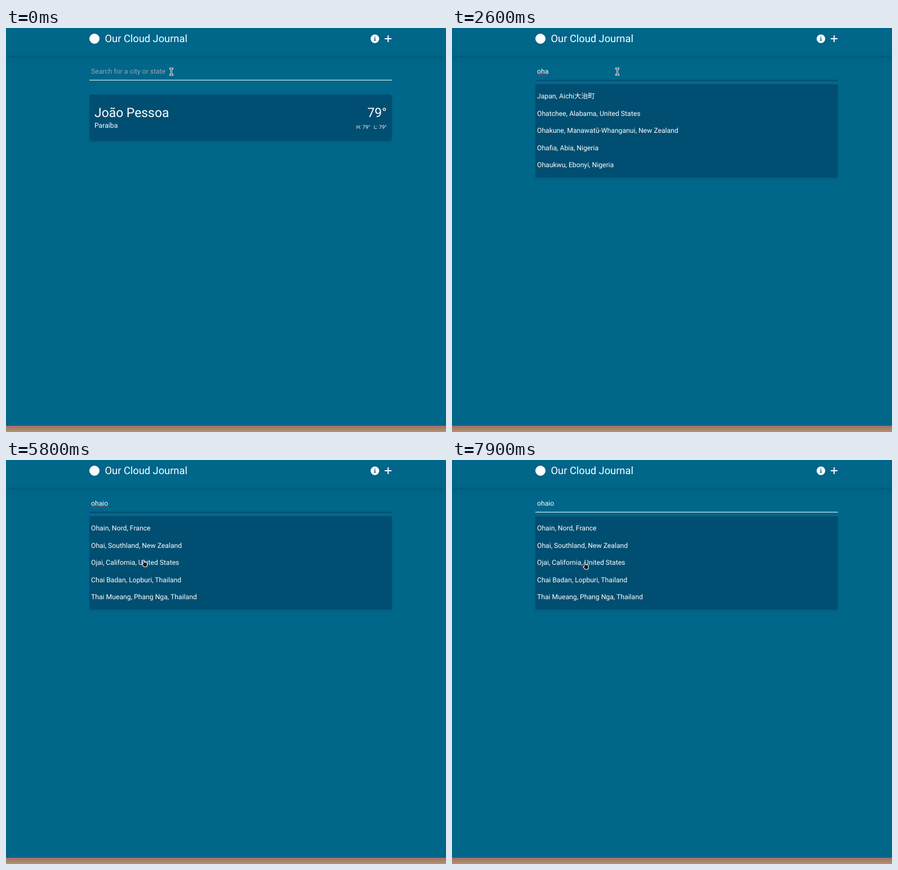
These frames come from a looping animation (781x717 px, 8000 ms). An HTML page:

```html
<!DOCTYPE html>
<html lang="en">
<head>
<meta charset="utf-8">
<title>Weather search</title>
<style>
  html, body { margin: 0; width: 100%; height: 100%; overflow: hidden; background: #00668a; }
  div, svg { position: absolute; }
  svg { left: 0; top: 0; }
  .header { left: 0; top: 0; width: 781px; height: 49px; background: #00668a;
    box-shadow: 0 7.6px 11.4px -2.3px #0000001a, 0 3px 4.6px -3px #0000001a; }
  .panel { left: 148px; width: 537px; background: #004e71;
    box-shadow: 0 3px 4.6px -.8px #0000001a, 0 1.5px 3px -1.5px #0000001a; }
  .card { top: 118px; height: 82px; border-radius: 4.6px; }
  .list { top: 100px; height: 165px; }
  .footer { left: 0; top: 707px; width: 781px; height: 10px; background: linear-gradient(#917866, #b7926f); }
  .edge { left: 0; top: 706px; width: 781px; height: 1px; background: #e0607c; }
  text { font: 12.2px Roboto, "Noto Sans CJK JP", "Noto Sans", sans-serif; fill: #fff;
    text-rendering: geometricPrecision; white-space: pre; }
  .title { font-size: 18.3px; }
  .big { font-size: 22.9px; }
  .small { font-size: 9.15px; }
  .end { text-anchor: end; }
  .hint { fill: #9ca3af; }
</style>
</head>
<body>
<div class="header"></div>
<div class="panel card" id="card"></div>
<div class="panel list" id="list"></div>
<div class="footer"></div>
<div class="edge"></div>
<svg width="781" height="717" viewBox="0 0 781 717">
  <circle cx="157" cy="19" r="9" fill="#fff"/>
  <text class="title" x="175.5" y="25">Our Cloud Journal</text>
  <g transform="translate(647.2 11.4) scale(.0298)">
    <circle cx="256" cy="256" r="256" fill="#fff"/>
    <circle cx="256" cy="160" r="32" fill="#00668a"/>
    <path d="M216 248h48v112M216 360h80" fill="none" stroke="#00668a" stroke-width="48" stroke-linecap="round" stroke-linejoin="round"/>
  </g>
  <path d="M673 19h10.6M678.3 13.7v10.6" stroke="#fff" stroke-width="2" stroke-linecap="round"/>

  <rect id="line" x="148" y="92" width="537"/>
  <text id="hint" class="hint" x="151" y="81">Search for a city or state</text>
  <text id="query" x="151" y="81"></text>
  <path id="squiggle" fill="none" stroke="#e0303c" stroke-width=".8"/>
  <rect id="caret" width="1" height="15" fill="#fff"/>

  <g id="cardText">
    <text class="big" x="157" y="158">João Pessoa</text>
    <text x="157" y="177">Paraíba</text>
    <text class="big end" x="675.7" y="158">79°</text>
    <text class="small end" x="646.5" y="179">H: 79°</text>
    <text class="small end" x="675.7" y="179">L: 79°</text>
  </g>
  <g id="rows"></g>

  <g id="beam" fill="none" stroke-linecap="square">
    <path d="M-2 -5.5H2M0 -5.5V5.5M-2 5.5H2" stroke="#fff" stroke-width="2.8"/>
    <path d="M-2 -5.5H2M0 -5.5V5.5M-2 5.5H2" stroke="#1c2a30" stroke-width="1"/>
  </g>
  <path id="hand" fill="#14181b" stroke="#fff" stroke-width="1.1" stroke-linejoin="round"
    d="M-2.9 1V-4.8a1.2 1.2 0 0 1 2.4 0V-2H2.8q1.8 0 1.8 1.8V3q0 3-2 3H-1.2L-4.3 2.4q-.6-1.6 1.4-1.4z"/>
</svg>
<script>
const LOOP = 8000, STEP = 100, BLINK = 600, BLUR = 7900;
const $ = id => document.getElementById(id);

// [time, typed text]; each entry also restarts the caret blink
const typing = [[200, ""], [1000, "o"], [1500, "oh"], [1600, "oha"], [3100, "ohai"], [3500, "ohaio"]];

const results = [
  [1500, ["Osasco, São Paulo, Brazil", "Oslo, Norway", "Oviedo, Asturias, Spain",
    "Омск, Omsk, Russia", "Oxford, Oxfordshire, England, United Kingdom"]],
  [1900, ["Japan, Aichi大治町", "Ohatchee, Alabama, United States", "Ohakune, Manawatū-Whanganui, New Zealand",
    "Ohafia, Abia, Nigeria", "Ohaukwu, Ebonyi, Nigeria"]],
  [3800, ["Ohain, Nord, France", "Ohai, Southland, New Zealand", "Ojai, California, United States",
    "Chai Badan, Lopburi, Thailand", "Thai Mueang, Phang Nga, Thailand"]]
];

// [time, x, y] of the pointer's centre
const pointer = [[5100, 293.5, 77.5], [5800, 246, 183.5], [6000, 243, 192], [6400, 240, 215],
  [6900, 239, 185], [7100, 238.5, 183.5], [7400, 238.5, 183.5], [7700, 237.5, 188]];

const rows = Array.from({ length: 5 }, (_, i) => {
  const row = document.createElementNS("http://www.w3.org/2000/svg", "text");
  row.setAttribute("x", 151);
  row.setAttribute("y", Math.round(125.4 + 30.5 * i));
  return $("rows").appendChild(row);
});

const latest = (list, t) => list.filter(entry => entry[0] <= t).pop();
const show = (id, on) => { $(id).style.display = on ? "" : "none"; };
const set = (id, attrs) => { for (const k in attrs) $(id).setAttribute(k, attrs[k]); };

function pointerAt(t) {
  const next = pointer.findIndex(p => p[0] > t);
  if (next === 0) return pointer[0].slice(1);
  if (next < 0) return pointer[pointer.length - 1].slice(1);
  const [t0, x0, y0] = pointer[next - 1], [t1, x1, y1] = pointer[next];
  const u = (t - t0) / (t1 - t0), k = u * u * (3 - 2 * u);
  return [x0 + (x1 - x0) * k, y0 + (y1 - y0) * k];
}

function zigzag(width) {
  let d = "M151 83.5";
  for (let x = 1.5, up = true; x <= width; x += 1.5, up = !up) d += `L${151 + x} ${up ? 82.3 : 83.5}`;
  return d;
}

function draw(t) {
  const focused = t >= 200 && t < BLUR;
  const [typedAt, text] = latest(typing, t) || [0, ""];
  $("query").textContent = text;
  const width = text ? $("query").getComputedTextLength() : 0;

  show("hint", !text);
  set("line", { height: focused ? 2 : 1, fill: focused ? "#004e71" : "#fff" });
  show("caret", focused && Math.floor((t - typedAt) / BLINK) % 2 === 0);
  set("caret", { x: Math.floor(151 + width), y: text ? 69 : 70 });
  show("squiggle", (t >= 2600 && t < 3100) || (t >= 4500 && t < BLUR));
  set("squiggle", { d: zigzag(width) });

  const found = latest(results, t);
  show("list", found);
  show("rows", found);
  show("card", !found);
  show("cardText", !found);
  if (found) rows.forEach((row, i) => { row.textContent = found[1][i]; });

  const [x, y] = pointerAt(t), overList = y > 98;
  show("beam", !overList);
  show("hand", overList);
  set(overList ? "hand" : "beam", { transform: `translate(${x} ${y})` });
}

const start = performance.now();
function tick() {
  const t = (performance.now() - start) % LOOP;
  draw(Math.floor(t / STEP) * STEP);
  requestAnimationFrame(tick);
}
tick();
</script>
</body>
</html>
```
